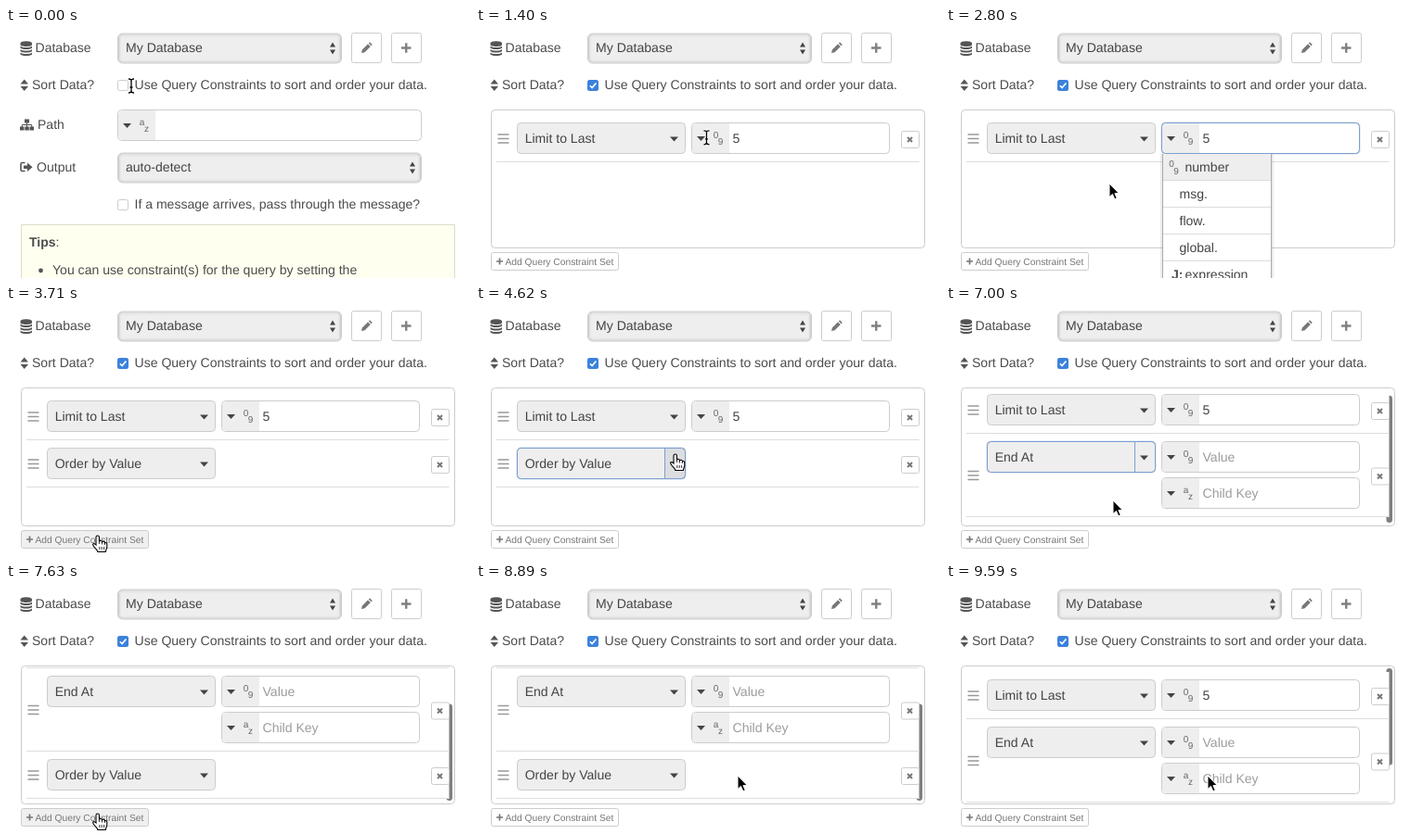
Recreate the animation shown at these times as an HTML page. Size 500x270 px, loop 9730 ms.

```html
<!DOCTYPE html>
<html lang="en">
<head>
<meta charset="utf-8">
<title>Query constraints form</title>
<style>
  html, body { margin: 0; width: 100%; height: 100%; overflow: hidden; background: #fff; }
  #stage { display: block; width: 500px; height: 270px; }
  text { font: 14.05px "Liberation Sans", Arial, sans-serif; fill: #4c4c4c; white-space: pre; text-rendering: geometricPrecision; }
  text.dark { fill: #444; }
  text.hint { fill: #9c9c9c; }
  text.mini { font-size: 10px; text-anchor: middle; fill: #666; }
  text.small { font-size: 10.25px; fill: #777; }
  text.bold { font-weight: bold; }
</style>
</head>
<body>
<svg id="stage" viewBox="0 0 500 270"></svg>
<script>
const LOOP = 9730, STEP = 70;
const LINE = '#ccc', BLUE = '#7c9fd0', CELL = '#eeeeee', INK = '#555';

// Drawing helpers
const box = (x, y, w, h, fill = '#fff', stroke = LINE, r = 4, extra = '') =>
  `<rect x="${x + .5}" y="${y + .5}" width="${w - 1}" height="${h - 1}" rx="${r}" fill="${fill}" stroke="${stroke}" ${extra}/>`;
const text = (x, y, s, cls = '') => `<text x="${x}" y="${y}" class="${cls}">${s}</text>`;
const path = (d, fill = INK, extra = '') => `<path d="${d}" fill="${fill}" ${extra}/>`;
const line = (d, stroke = INK, width = 1) => path(d, 'none', `stroke="${stroke}" stroke-width="${width}"`);
const group = (id, body, extra = '') => `<g id="${id}" ${extra}>${body}</g>`;
const clip = (id, x, y, w, h, body) =>
  `<svg id="${id}" x="${x}" y="${y}" width="${w}" height="${h}" viewBox="${x} ${y} ${w} ${h}" preserveAspectRatio="xMinYMin slice">${body}</svg>`;
const caret = (x, y) => path(`M${x - 4.5} ${y - 2.5}h9l-4.5 5z`, '#444');
const pair = (x, y, a, b) => text(x, y, a, 'mini') + text(x + 5, y + 7.5, b, 'mini');
const focusRing = (x, y, w, h) => box(x, y, w, h, 'none', BLUE) +
  box(x - 1, y - 1, w + 2, h + 2, 'none', BLUE, 5, 'stroke-opacity=".2"');

function nativeSelect(x, y, w, h, label) {
  const ax = x + w - 10, ay = y + h / 2;
  const shades = ['#cdcdcd', '#cfcfcf', '#dedede', '#e8e8e8'];
  return shades.map((c, i) => box(x + i, y + i, w - 2 * i, h - 2 * i, '#eee', c, 5 - i)).join('') +
    text(x + 9, y + 20.5, label, 'dark') +
    path(`M${ax - 3} ${ay - 1.5}h6l-3-5z M${ax - 3} ${ay + 1.5}h6l-3 5z`, '#444');
}

function typedInput(x, y, w, h, icon, value, cls) {
  return box(x, y, w, h) +
    path(`M${x + 41} ${y + 1}v${h - 2}h-37q-3 0-3-3v${8 - h}q0-3 3-3z`, CELL) +
    caret(x + 10.5, y + 17.5) + pair(x + 26.5, y + 16.5, ...icon) +
    text(x + 44.5, y + 22, value, cls);
}

const combo = (y, label) => box(44, y, 182, 34, CELL) + text(52.7, y + 22, label, 'dark') + caret(213.5, y + 18);

function row(id, y, h, label, fields = []) {
  const m = y + h / 2;
  return group(id,
    `<rect x="22" y="${y}" width="455.5" height="${h}" fill="#fff"/>` +
    line(`M23.5 ${m - 4.5}h12m-12 4.5h12m-12 4.5h12`, '#999', 1.5) +
    combo(y + 8, label) +
    fields.map((f, i) => typedInput(232, y + 8 + 39 * i, 214, 34, ...f)).join('') +
    box(458, m - 8.5, 20, 19, '#fff', LINE, 2) +
    line(`M465 ${m - 1.5}l5 5m0-5l-5 5`, '#777', 2) +
    line(`M22 ${y + h - .5}h455.5`, '#ddd'));
}

function menu(id, x, y, w, items, textX) {
  const body = items.map((s, i) => {
    const top = y + 29 * i;
    return (i ? '' : `<rect x="${x}" y="${y}" width="${w}" height="28" fill="#eee"/>`) +
      text(textX[i] ?? textX[1], top + 19, s, 'dark') +
      line(`M${x} ${top + 28.5}h${w}`, '#ddd');
  }).join('');
  const icons = id === 'typeMenu'
    ? pair(243, y + 14, '0', '9') + text(243, y + 135, 'J:', 'bold') : '';
  return clip(id, x - 3, y, w + 6, 270 - y,
    `<rect x="${x - 2}" y="${y}" width="${w + 4}" height="150" fill="#000" opacity=".08"/>` +
    box(x, y - 1, w, 160, '#fff', '#aaa', 0) + body + icons + line(`M${x + .5} ${y}v150m${w - 1} 0v-150`, '#aaa'));
}

const header =
  path('M15.500 16.500c0-3 12.500-3 12.500 0v1.500c0 2.600-12.500 2.600-12.500 0z' +
    [19.5, 23, 26.5].map(y => `M15.500 ${y}c2 2 10.500 2 12.500 0v1.800c0 2.400-12.500 2.400-12.500 0z`).join('')) +
  text(31.5, 26, 'Database') +
  nativeSelect(120, 5.5, 242, 33, 'My Database') +
  box(372, 5, 33, 33, '#fff', LINE, 2) +
  path('M383 27l.8-3.600 6.200-6.200 2.800 2.800-6.200 6.200zM390.800 16.400l1.200-1.200 2.800 2.800-1.200 1.200z', '#777') +
  box(415, 5, 33, 33, '#fff', LINE, 2) +
  line('M426 21.500h10.500m-5.250-5.250v10.500', '#808080', 2.4) +
  path('M15.500 60.500h8.500l-4.250-5zM15.500 63h8.500l-4.250 5z') +
  text(28, 66, 'Sort Data?') +
  text(138.500, 66, 'Use Query Constraints to sort and order your data.') +
  box(120, 56, 12, 12, '#fff', LINE, 2) +
  group('check', '<rect x="120" y="56" width="12" height="12" rx="2.500" fill="#3b82dc"/>' +
    line('M122.800 62.200l2.300 2.400 4.300-5.200', '#fff', 1.6));

const lower =
  path('M20 98.500h5v4h-5zM15 106.500h4.500v4h-4.500zM20.300 106.500h4.500v4h-4.500zM25.500 106.500h4.500v4h-4.500z') +
  line('M22.500 102v5M17.300 107v-2.500h10.400v2.500') +
  text(34, 109, 'Path') +
  typedInput(120, 88, 328, 34, ['a', 'z'], '', '') +
  line('M20.500 145.500h-3q-1.500 0-1.500 1.500v6q0 1.500 1.500 1.500h3', INK, 1.6) +
  path('M19 148.500h4v-3l5.500 4.700-5.500 4.700v-3h-4z') +
  text(33, 155, 'Output') +
  nativeSelect(120, 134.5, 328, 33, 'auto-detect') +
  box(120, 185, 12, 12, '#fff', LINE, 2) +
  text(138.500, 195, 'If a message arrives, pass through the message?') +
  box(16, 212, 468, 90, '#fffff0', '#ddddc8', 0) +
  text(25, 236, 'Tips', 'bold') + text(53.500, 236, ':') +
  `<circle cx="37.500" cy="262" r="2.400" fill="${INK}"/>` +
  text(50, 266, 'You can use constraint(s) for the query by setting the');

const five = [['0', '9'], '5', 'dark'];
const pairFields = [[['0', '9'], 'Value', 'hint'], [['a', 'z'], 'Child Key', 'hint']];

const panel =
  box(16, 88, 468, 150) +
  clip('view', 17, 89, 466, 148,
    '<rect id="thumb" x="474.500" width="6.500" rx="3.200" fill="#7e7e7e"/>' +
    group('list',
      row('limit', 94, 51, 'Limit to Last', [five]) +
      row('order', 145, 51, 'Order by Value') +
      row('end', 145, 90, 'End At', pairFields) +
      row('third', 235, 51, 'Order by Value') +
      group('typeFocus', focusRing(232, 102, 214, 34)) +
      group('comboFocus', focusRing(44, 153, 182, 34) + line('M203.500 154v32', BLUE) +
        group('pressed', '<rect x="204" y="154" width="21" height="32" fill="#234" opacity=".09"/>')))) +
  `<rect id="add" x="16.500" y="242.500" width="137" height="19" rx="2" stroke="${LINE}"/>` +
  line('M22 252h7m-3.500-3.500v7', '#777', 1.7) +
  text(31.500, 255.500, 'Add Query Constraint Set', 'small');

const handLine = 'M.4 5v3M3.500 6v2.500M6.400 7v2M.8 11v3M3.200 11v3M5.600 11v3';
const beamLine = 'M-3-7q3 0 3 2v11q0 2-3 2M3-7q-3 0-3 2M0 6q0 2 3 2M-1.500 2h3';
const cursors =
  group('arrow', path('M0 0V14.500L3.400 11.400 5.800 16.800 8.200 15.800 5.900 10.600H10.300Z', '#000', 'stroke="#fff" stroke-width="1"')) +
  group('hand', path('M-3 .5C-3-1.600.4-1.600.4.5V5.200C1 4 3.400 4.200 3.500 5.800 4.200 4.800 6.300 5.200 6.400 6.800 7.300 6.200 8.800 6.800 8.800 8.300V11C8.800 13.500 7.400 14 7.400 16.500H-1.200C-1.400 14.500-4 13-5.800 10-7.400 7.600-5.200 6.600-3 9Z', '#fff', 'stroke="#000" stroke-width="1.100"') +
    line(handLine, '#000', .8)) +
  group('beam', line(beamLine, '#fff', 3) + line(beamLine, '#000', 1.3));

const stage = document.getElementById('stage');
stage.innerHTML = header +
  clip('slide', 0, 80, 500, 190, panel) +
  group('lower', lower) +
  menu('typeMenu', 233, 136, 118, ['number', 'msg.', 'flow.', 'global.', 'expression'], [257.5, 251.5, 251.5, 251.5, 257.5]) +
  menu('comboMenu', 46, 187, 180, ['End At', 'Equal To', 'Limit to First'], [56, 56]) +
  '<circle id="ripple" fill="#777" fill-opacity=".22"/>' + group('cursor', cursors);

const parts = {};
stage.querySelectorAll('[id]').forEach(e => parts[e.id] = e);

// Cursor moves: first step, last step, end x, end y, shape
const moves = [
  [0, 0, 135, 62, 'beam'], [70, 70, 123, 63, 'arrow'],
  [980, 1610, 281, 132, 'beam'], [1680, 1890, 250, 122, 'hand'],
  [2590, 2660, 184, 166, 'arrow'], [2730, 2800, 176, 168, 'arrow'],
  [3150, 3430, 100, 249, 'hand'], [3990, 4340, 216, 161, 'hand'],
  [5110, 5250, 195, 202, 'hand'], [5670, 5880, 262, 183, 'hand'],
  [6160, 6370, 180, 210, 'arrow'], [7070, 7280, 100, 249, 'hand'],
  [7840, 7910, 208, 207, 'hand'], [7980, 7980, 166, 207, 'hand'],
  [8400, 8890, 282, 207, 'arrow']
];
const clicks = [140, 1960, 2660, 3500, 4480, 5320, 7350];
const scrolls = [[6650, 6860, 7], [7490, 7630, 54], [9170, 9380, -4], [9520, 9590, -1]];

const part = (t, a, b) => Math.min(1, Math.max(0, (t - a + STEP) / (b - a + STEP)));
const swing = p => .5 - Math.cos(Math.PI * p) / 2;
const within = (t, a, b) => t >= a && t < b;
const show = (id, on) => parts[id].style.display = on ? '' : 'none';
const set = (id, attrs) => { for (const k in attrs) parts[id].setAttribute(k, attrs[k]); };

function cursorAt(t) {
  let x = 135, y = 62, kind = 'beam';
  for (const [a, b, nx, ny, shape] of moves) {
    if (t < a) break;
    const p = swing(part(t, a, b));
    x += (nx - x) * p;
    y += (ny - y) * p;
    if (p >= .5) kind = shape;
  }
  return { x, y, kind };
}

function scrollAt(t) {
  let s = 0;
  for (const [a, b, to] of scrolls) if (t >= a) s += (to - s) * swing(part(t, a, b));
  return s;
}

function unroll(id, t, open, close, height) {
  const k = part(t, open, open + STEP) - part(t, close, close + STEP);
  show(id, k > 0);
  const [x, y, w] = parts[id].getAttribute('viewBox').split(' ');
  const h = Math.max(1, height * k);
  set(id, { height: h, viewBox: `${x} ${y} ${w} ${h}` });
}

function draw(t) {
  const opened = t < 280 ? 0 : swing(part(t, 280, 630));
  show('check', t >= 280);
  show('slide', opened > 0);
  const h = Math.max(1, 190 * opened);
  set('slide', { height: h, viewBox: `0 80 500 ${h}` });
  set('lower', { transform: `translate(0 ${190 * opened})` });

  show('order', within(t, 3710, 5600));
  show('end', t >= 5600);
  show('third', t >= 7490);
  show('typeFocus', within(t, 2100, 2940));
  show('comboFocus', within(t, 4620, 7490));
  show('pressed', t < 5600);
  unroll('typeMenu', t, 2170, 2870, 134);
  unroll('comboMenu', t, 4690, 5530, 83);

  const s = scrollAt(t);
  set('list', { transform: `translate(0 ${-s})` });
  const total = t < 7490 ? 153 : 200, size = 146 * 146 / total;
  show('thumb', t >= 6650);
  set('thumb', { y: Math.max(91, 90 + s * 146 / total), height: size - 2 });

  const c = cursorAt(t);
  set('cursor', { transform: `translate(${c.x} ${c.y})` });
  for (const k of ['arrow', 'hand', 'beam']) show(k, k === c.kind);
  const overAdd = c.y > 242 && c.x < 154;
  set('add', { fill: overAdd ? '#f0f0f0' : '#fff' });

  const click = clicks.find(k => within(t, k, k + 2 * STEP));
  show('ripple', click !== undefined);
  if (click !== undefined) {
    const at = cursorAt(click);
    set('ripple', { cx: at.x, cy: at.y, r: t < click + STEP ? 22 : 32 });
  }
}

const start = performance.now();
function tick(now) {
  const t = Math.max(0, now - start) % LOOP;
  draw(Math.floor(t / STEP) * STEP);
  requestAnimationFrame(tick);
}
draw(0);
requestAnimationFrame(tick);
</script>
</body>
</html>
```
